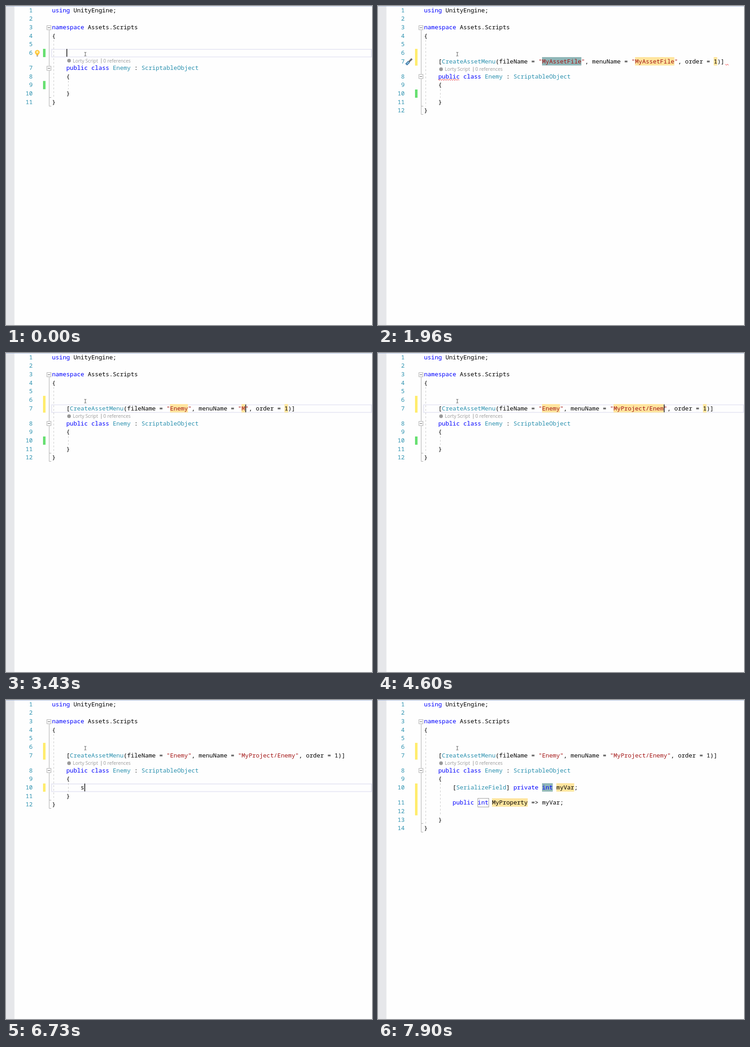
An HTML page with a canvas that plays this animation: 801 by 699 pixels, repeating every 8 s.

```html
<!DOCTYPE html>
<html lang="en">
<head>
<meta charset="utf-8">
<title>Code editor snippets</title>
<style>
html, body { margin: 0; width: 100%; height: 100%; overflow: hidden; background: #fefefe; }
canvas { display: block; }
</style>
</head>
<body>
<canvas id="stage" width="801" height="699"></canvas>
<script>
const ctx = document.getElementById('stage').getContext('2d');
const LOOP = 8000;
const X0 = 100.7, CW = 7.827, LH = 18.66, GAP = 14.4;
const MONO = '13.045px "Noto Sans Mono", monospace';
const UI = '"Open Sans", sans-serif';
const BLUE = '#0000ff', TEAL = '#2b91af', RED = '#a31515';
const PICK = '#8fb6b7', FIELD = '#ffe59e', GREEN = '#66df70', YELLOW = '#ffec6c';
const TOKEN = /("[^"]*")|\b(using|namespace|public|private|class|int)\b|\b(CreateAssetMenu|Enemy|ScriptableObject|SerializeField)\b/g;

const colX = c => X0 + c * CW;
const typed = (word, t, start, step) => word.slice(0, Math.max(0, Math.floor((t - start) / step + 1e-6) + 1));
const between = (t, a, b) => t >= a && t < b;
const clamp = v => Math.min(1, Math.max(0, v));

function rect(x, y, w, h, color) {
  ctx.fillStyle = color;
  ctx.fillRect(x, y, w, h);
}

function frame(x, y, w, h, color, width = 1) {
  ctx.strokeStyle = color;
  ctx.lineWidth = width;
  ctx.strokeRect(x, y, w, h);
}

function line(x1, y1, x2, y2, color, dash = []) {
  ctx.strokeStyle = color;
  ctx.lineWidth = 1;
  ctx.setLineDash(dash);
  ctx.beginPath();
  ctx.moveTo(x1, y1);
  ctx.lineTo(x2, y2);
  ctx.stroke();
  ctx.setLineDash([]);
}

function disc(x, y, r, color) {
  ctx.fillStyle = color;
  ctx.beginPath();
  ctx.arc(x, y, r, 0, 7);
  ctx.fill();
}

function label(text, x, y, size, color) {
  ctx.font = size + 'px ' + UI;
  ctx.fillStyle = color;
  ctx.fillText(text, x, y);
}

// every glyph sits on the column grid
function mono(text, x, y, color) {
  ctx.font = MONO;
  ctx.fillStyle = color;
  [...text].forEach((ch, i) => ch !== ' ' && ctx.fillText(ch, x + i * CW, y));
}

function code(text, y, plainTypes) {
  let last = 0;
  const put = (s, at, color) => mono(s, colX(at), y, color);
  for (const m of text.matchAll(TOKEN)) {
    put(text.slice(last, m.index), last, '#000');
    put(m[0], m.index, m[1] ? RED : m[2] ? BLUE : plainTypes ? '#000' : TEAL);
    last = m.index + m[0].length;
  }
  put(text.slice(last), last, '#000');
}

function squiggle(x1, x2, y) {
  ctx.strokeStyle = '#f03030';
  ctx.lineWidth = 1;
  ctx.beginPath();
  for (let x = x1, i = 0; x <= x2; x += 2.4, i++) ctx.lineTo(x, y + (i % 2 ? 2.6 : 0));
  ctx.stroke();
}

function bulb(x, y) {
  disc(x, y - 1.5, 5.2, '#ffc83c');
  disc(x, y - 2, 2.4, '#fff0b0');
  rect(x - 2, y + 3, 4, 2.2, '#f0b030');
  rect(x - 1.6, y + 5.8, 3.2, 1.6, '#808080');
}

function brush(x, y) {
  ctx.save();
  ctx.translate(x, y);
  ctx.rotate(-Math.PI / 4);
  rect(-9, -2.8, 9, 5.6, '#3f7fae');
  rect(-7, -0.6, 6, 1.2, '#d4e6f2');
  rect(0, -1.6, 3, 3.2, '#555');
  rect(3, -2, 6, 4, '#6c6c6c');
  ctx.restore();
}

function popup(x, y, w, rows) {
  const h = rows.length * 11.2 + 15;
  rect(x, y, w, h, '#f6f7fb');
  rows.forEach((name, i) => {
    const top = y + 1 + i * 11.2;
    if (!i) rect(x + 1, top, w - 2, 11, '#c5daf3');
    frame(x + 2.5, top + 2, 6, 7, '#777');
    label(name, x + 12, top + 8, 6.5, '#222');
  });
  rect(x + 1, y + h - 13.5, w - 2, 13, '#eef0f6');
  for (let i = 0; i < 3; i++) line(x + 5, y + h - 10 + i * 3, x + 11, y + h - 10 + i * 3, '#c4c7d0');
  frame(x + 21.5, y + h - 10.5, 6, 7, '#777');
  frame(x + 0.5, y + 0.5, w - 1, h - 1, '#cdd2e2');
}

function hint(alpha, full) {
  const h = full ? 32 : 29;
  ctx.globalAlpha = alpha;
  rect(172, 112.5, 201.5, h, '#f4f6fc');
  frame(172.5, 113, 200.5, h - 1, '#b3bbd2');
  label("IDE1007: The name 'asset' does not exist in the current context.", 179.3, 124.4, 6.34, '#1e1e1e');
  label('Show potential fixes', 179.3, 139.6, 6.34, '#0e63b8');
  label('(Alt+Enter or Ctrl+.)', 241.3, 139.6, 6.34, '#1e1e1e');
  ctx.globalAlpha = 1;
}

function fixButton() {
  rect(148, 113, 19, 11.5, '#dbe7f8');
  frame(148.5, 113.5, 18, 10.5, '#b8c8e4');
  disc(154, 117.5, 2.6, '#ffc83c');
  disc(156.3, 120.5, 2.3, '#e03c31');
  ctx.fillStyle = '#333';
  ctx.beginPath();
  ctx.moveTo(160, 118);
  ctx.lineTo(164, 118);
  ctx.lineTo(162, 120.5);
  ctx.fill();
}

function ibeam(x, y) {
  line(x + 0.5, y - 3.5, x + 0.5, y + 4.5, '#555');
  line(x - 2, y - 3.5, x + 3, y - 3.5, '#777');
  line(x - 2, y + 4.5, x + 3, y + 4.5, '#777');
}

// everything the editor shows at time t
function stateAt(t) {
  const s = { lines: ['using UnityEngine;', '', 'namespace Assets.Scripts', '{', ''], marks: [], caret: null };
  const open = t >= 1560, body = t >= 7500;
  const add = (...rows) => s.lines.push(...rows);

  if (!open) {
    const word = typed('asset', t, 60, 54);
    add('    ' + word);
    s.caret = [5, 4 + word.length];
  } else {
    const file = t < 2330 ? 'MyAssetFile' : typed('Enemy', t, 2330, 82);
    const menu = t < 3430 ? 'MyAssetFile'
      : t < 4460 ? typed('MyProject/En', t, 3430, 70)
      : 'MyProject/Ene' + (t >= 4600 ? 'm' : '') + (t >= 4730 ? 'y' : '');
    const head = '    [CreateAssetMenu(fileName = "';
    const mid = head + file + '", menuName = "';
    const tail = mid + menu + '", order = ';
    add('', tail + '1)]');
    const pick = t < 2330 ? 0 : between(t, 2860, 3430) ? 1 : between(t, 5000, 5500) ? 2 : -1;
    if (t < 5500) {
      [[head, file], [mid, menu], [tail, '1']].forEach(([pre, word], i) =>
        s.marks.push([6, pre.length, word.length, i === pick ? PICK : FIELD]));
      if (t >= 2330 && pick < 0) s.caret = t < 2860 ? [6, head.length + file.length] : [6, mid.length + menu.length];
      if (between(t, 2160, 2330)) s.bar = [6, head.length + file.length];
      if (between(t, 3160, 3430)) s.bar = [6, mid.length + menu.length];
    } else if (!body) {
      s.caret = t < 5750 ? [6, tail.length + 3] : t < 5900 ? [7, 41] : t < 6050 ? [8, 5] : [9, 8];
    }
  }

  s.cls = s.lines.length;
  add('    public class Enemy : ScriptableObject', '    {');
  s.edit = s.lines.length;
  if (body) {
    add('        [SerializeField] private int myVar;', '        public int MyProperty => myVar;', '');
    s.prop = s.edit + 1;
    s.marks.push([s.edit, 33, 3, PICK], [s.edit, 37, 5, FIELD], [s.prop, 19, 10, FIELD]);
  } else {
    const word = typed('serprop', t, 6730, 55);
    add(word ? '        ' + word : '');
    if (word) s.caret = [s.edit, 8 + word.length];
  }
  add('    }', '}');

  s.open = open;
  s.body = body;
  return s;
}

function draw(t) {
  const s = stateAt(t);
  const n = s.lines.length;
  const top = i => i * LH + (i >= s.cls ? GAP : 0) + (s.prop && i >= s.prop ? GAP : 0);
  const end = i => top(i) + LH;

  rect(0, 0, 801, 699, '#fefefe');
  rect(0, 0, 18.5, 699, '#e6e7ea');
  rect(0, 0, 801, 1, '#a9bbdf');

  // change bars
  const bar = (a, b, color) => rect(81, top(a) + 0.6, 5.5, end(b) - top(a) - 0.6, color);
  bar(5, s.open ? 6 : 5, t < 60 ? GREEN : YELLOW);
  bar(s.edit, s.body ? s.edit + 2 : s.edit, t < 6730 ? GREEN : YELLOW);

  // current line and fields
  if (s.caret) frame(100, top(s.caret[0]) + 1.6, 700, LH - 2, '#e6e6f3', 1.8);
  for (const [row, col, len, color] of s.marks) rect(colX(col), top(row), len * CW, LH - 0.3, color);

  // outlining
  const grey = '#a8a8a8', mid = i => Math.round(top(i) + 9.2) + 0.5;
  const fold = i => {
    frame(89.5, mid(i) - 4.5, 9, 9, grey);
    line(91.5, mid(i), 96.5, mid(i), '#555');
  };
  const foot = i => Math.round(end(i)) - 0.5;
  line(94.5, mid(2) + 5, 94.5, mid(s.cls) - 5, grey);
  line(94.5, mid(s.cls) + 5, 94.5, foot(n - 1), grey);
  line(94.5, foot(n - 2), 99, foot(n - 2), grey);
  line(94.5, foot(n - 1), 99, foot(n - 1), grey);
  fold(2);
  fold(s.cls);
  line(104.5, end(3), 104.5, end(n - 2), '#c6c6c6', [4, 4]);
  line(136.5, end(s.cls + 1), 136.5, top(n - 2), '#c6c6c6', [4, 4]);

  // text
  s.lines.forEach((text, i) => {
    const y = top(i) + 13.8, num = String(i + 1);
    mono(num, 58.4 - num.length * CW, y, TEAL);
    code(text, y, i === s.edit && t < 7760);
  });
  const ly = top(s.cls) - GAP + 11.7;
  disc(138, ly - 3.8, 4, '#9a9a9a');
  label('Lorty Script', 146.3, ly, 10.4, '#999');
  line(208.5, ly - 9, 208.5, ly + 2, '#999');
  label('0 references', 213, ly, 10.4, '#999');

  if (s.body) {
    ctx.setLineDash([1, 1]);
    frame(218.5, Math.round(top(s.prop)) + 0.5, 24, 19, '#333');
    ctx.setLineDash([]);
  }
  if (between(t, 1700, 2000)) {
    squiggle(colX(4), colX(10), top(s.cls) + 15.4);
    squiggle(760, 769, top(6) + 15.4);
  }

  const bold = s.caret || s.bar;
  if (bold && !between(t, 560, 800)) rect(colX(bold[1]) + 0.5, top(bold[0]) + 0.8, 1.5, LH - 1.6, '#000');

  // gutter actions
  if (t < 60) bulb(68.5, 103);
  if (between(t, 1840, 2330) || between(t, 5200, 6500)) brush(68, 122);

  // completion and hints
  if (between(t, 114, 1260)) popup(132.5, 112, 57, ['assetmenu']);
  if (between(t, 800, 1030)) fixButton();
  if (between(t, 530, 1060)) {
    line(189, 112.5, 342, 112.5, '#c3cadd');
    hint(t < 1000 ? clamp((t - 497) / 133) : clamp((1060 - t) / 90), t >= 800);
  }
  if (between(t, 6800, 7500)) {
    const names = ['SerializeField', 'SerializableAttribute', 'SerializeReference', 'SerializationInfo',
      'SerializedObject', 'SerializedProperty', 'SerializationException', 'SerializationBinder', 'serprop'];
    popup(163.5, 201, 160, t < 6950 ? names : t < 7200 ? ['serprop', 'SerializedProperty'] : ['serprop']);
  }

  ibeam(173, 105);
}

const begin = performance.now();
function tick() {
  draw((performance.now() - begin) % LOOP);
  requestAnimationFrame(tick);
}
tick();
</script>
</body>
</html>
```
